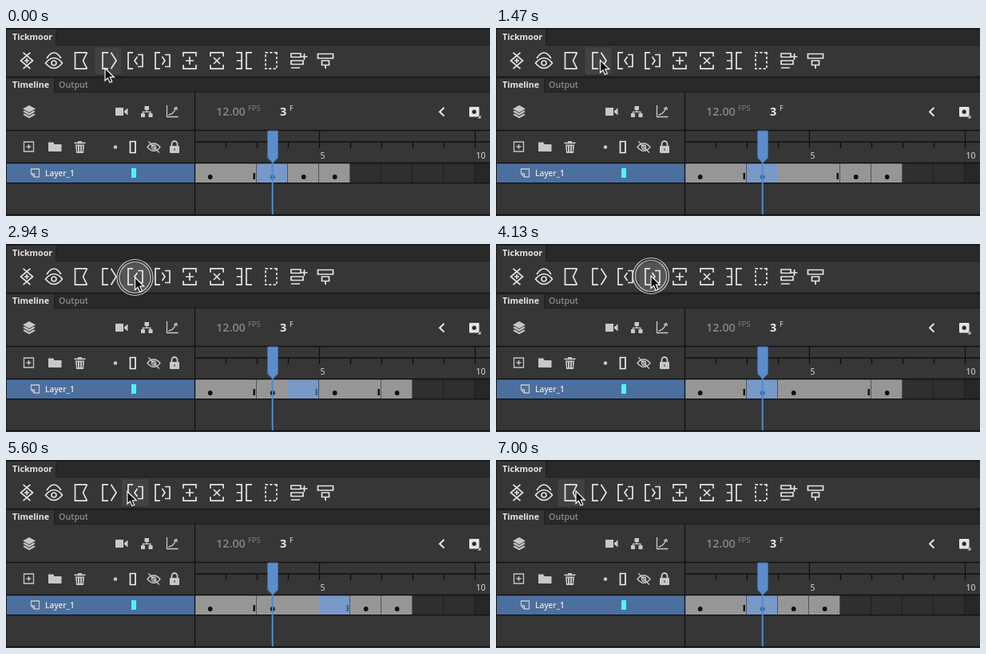
Animation, 606 px wide and 236 px high, one loop 7140 ms. Source, as an HTML page:

```html
<!DOCTYPE html>
<html lang="en">
<head>
<meta charset="utf-8">
<title>Timeline panel</title>
<style>
html, body { margin: 0; width: 100%; height: 100%; overflow: hidden; background: #363636; }
svg { display: block; width: 606px; height: 236px; }
text { font-family: "Open Sans", "Noto Sans", sans-serif; fill: #e6e6e6; }
.tab { font-size: 10.7px; font-weight: 700; }
.dim { fill: #858585; }
.rule { fill: none; stroke: #101010; stroke-width: 1.3; }
.thin { fill: none; stroke: #c8c8c8; stroke-width: 1.3; }
.solid { fill: #c8c8c8; }
#tools { fill: none; stroke: #e4e4e4; stroke-width: 1.7; }
#marquee { stroke-dasharray: 3.2 2.3; }
</style>
</head>
<body>
<svg viewBox="0 0 606 236">
  <rect width="606" height="236" fill="#363636"/>
  <!-- panel tabs -->
  <path fill="#1d1d1d" d="M0 0H606V2H0ZM0 60.500H606V63H0Z"/>
  <path fill="#292929" d="M62 2H606V21H62ZM60 63H606V80H60Z"/>
  <path fill="none" stroke="#1d1d1d" d="M62.500 2V21.500H606M60.500 63V80.500H606M.5 2V236"/>
  <text class="tab" x="8" y="15">Tickmoor</text>
  <text class="tab" x="8" y="75">Timeline</text>
  <text class="tab" x="66" y="75" style="fill:#8c8c8c;font-weight:600">Output</text>

  <rect id="hover" y="24" width="33" height="34" rx="2" fill="#424242"/>
  <g id="tools"></g>

  <!-- controls -->
  <g class="solid">
    <path id="sheet" d="M29 97L37 101.500L29 106L21 101.500Z"/>
    <path id="edge" d="M21 105L23.500 103.700L29 107L34.500 103.700L37 105L29 109.500Z"/>
    <use href="#edge" y="3.700"/>
    <path d="M137 100H147V110H137ZM148 104L152.500 100.500V109.500L148 106Z"/>
    <path d="M173.500 98h5.500v5h-5.500ZM169 107h5v5h-5ZM178.500 107h5v5h-5Z"/>
    <path d="M53 143.500H59L61 146H69.500V155H53Z"/>
    <path d="M85.500 143.500H90V142H95V143.500H99.500V145.300H85.500ZM87 146.500H98L97 157H88Z"/>
    <circle cx="137" cy="149.500" r="2.300"/>
    <rect x="205" y="148" width="12" height="9" rx="1"/>
    <path d="M594.500 109.500V113.500H590.500Z"/>
  </g>
  <g class="thin">
    <path d="M176.300 103V105.500M171.500 107V105.300H181V107"/>
    <path d="M201.500 97V111.500H215.500M203.500 109Q210 108 213 100M210 101.500L213.300 99.500L214.500 103"/>
    <path d="M22.500 143h12v12h-12ZM28.500 146v6M25.500 149h6"/>
    <path d="M155.500 142.500h6.500v14h-6.500Z" stroke="#eee" stroke-width="1.700"/>
    <path d="M177 149.500Q185 140 193 149.500Q185 159 177 149.500ZM178.500 142.500L192 156.500"/>
    <circle cx="185" cy="149.500" r="2.500"/>
    <path d="M207.500 148V145.500A3.500 3.500 0 0 1 214.500 145.500V148" stroke-width="1.800"/>
    <path d="M548.500 100L543 105.200L548.500 110.500" stroke="#e6e6e6" stroke-width="2"/>
  </g>
  <path d="M89.500 148v7m3 -7v7m3 -7v7M211 151v3" stroke="#363636"/>
  <rect x="580" y="99" width="12.500" height="12.500" rx="1" fill="#e4e4e4"/>
  <circle cx="586.200" cy="105.200" r="2.600" fill="#2b2b2b"/>
  <text class="dim" x="263" y="110" font-size="14.400" font-weight="600">12.00</text>
  <text class="dim" x="303" y="104" font-size="9.300">FPS</text>
  <text x="343" y="110" font-size="14.400" font-weight="700">3</text>
  <text x="355" y="104" font-size="9">F</text>

  <!-- ruler and layer row -->
  <path id="ruler" class="rule"/>
  <text x="393.500" y="164" font-size="10.500">5</text>
  <text x="588.500" y="164" font-size="10.500">10</text>
  <rect x="1" y="170" width="235" height="25" fill="#4b6f9f"/>
  <path class="thin" d="M31.500 177H41.500V187H35.500L31.500 183ZM31.500 183H35.500V187"/>
  <text x="49" y="186" font-size="10" font-weight="600">Layer_1</text>
  <rect x="157" y="176" width="6" height="12" fill="#52f3fb"/>
  <g id="cells"></g>
  <path class="rule" d="M0 169.500H606M0 194.700H606M236.500 80V236M0 234.500H606"/>
  <path d="M333.700 165V234" stroke="#4f8ad2" stroke-width="2"/>
  <path d="M327.500 129H340.500V163L334 169.500L327.500 163Z" fill="#5b8dcc" stroke="#40699f"/>

  <g id="ring" fill="#fff" stroke="#c4c4c4" stroke-width="1.200">
    <circle r="22.500" fill-opacity=".02"/>
    <circle r="19.500" fill-opacity=".08"/>
  </g>
  <path id="cursor" d="M0 0V15.500L3.500 12.200L6 18L8.800 16.800L6.300 11.200H11.300Z" fill="#0b0b0b" stroke="#f4f4f4" stroke-width="1.200"/>
</svg>
<script>
const LOOP = 7140, STEP = 70, X0 = 236, CELL = 39, PITCH = 34, FRAMES = 10;
const SELECTED = 3;
const el = id => document.getElementById(id);
const set = (id, name, value) => el(id).setAttribute(name, value);

// Icon parts, drawn around the centre of a tool button
const side = (x, dx, h = 10.2) => `M${x + dx} ${-h}H${x}V${h}H${x + dx}`;
const angle = (x, dx, h = 10.2) => `M${x + dx} ${-h}L${x} 0L${x + dx} ${h}`;
const cap = (y, dy) => `M-8 ${y + dy}V${y}H8V${y + dy}`;
const plus = (x, y, r) => `M${x - r} ${y}h${2 * r}M${x} ${y - r}v${2 * r}`;
const bar = (x, y, w, h) => `M${x} ${y}h${w}v${h}h${-w}Z`;
const caps = cap(-10.2, 5) + cap(10.2, -5);
const pair = side(-9, 6) + side(9, -6, 7.5);

const tools = {
  weave: angle(7.5, -12) + angle(-7.5, 12) + plus(0, 0, 3),
  eye: 'M-9 -3Q0 -17 9 -3M-10.500 3Q0 -10 10.500 3Q0 16 -10.500 3ZM-3 3a3 3 0 1 0 6 0a3 3 0 1 0 -6 0',
  shrink: side(-7.5, 15) + angle(2.5, 5),
  extend: side(-7, 7) + angle(10, -6.5),
  rollBack: pair + angle(-1, 3.5, 5),
  rollOn: pair + angle(3, -3.5, 5),
  add: caps + plus(0, 0, 5),
  clear: caps + 'M-4 -4L4 4M4 -4L-4 4',
  split: side(-3, -7) + side(3, 7) + 'M-9 0h6',
  marquee: side(-7, 14) + 'Z',
  stack: bar(-9, -9, 12, 4.5) + bar(-9, 0, 15, 4.5) + 'M-9 9H2' + plus(7.5, -5, 4),
  nest: bar(-9.5, -8.5, 19, 5.5) + bar(-4.5, 0, 9, 5.5) + 'M0 5.500V10'
};

// Each stop: travel time, button point, click times and their effect on
// the end of the selected span and on the frame count
const stops = [
  { from: 0, to: 420, tip: [130.5, 40.5], clicks: [980, 1470], end: 1, count: 1 },
  { from: 1610, to: 2100, tip: [161.5, 42], clicks: [2590, 3220], end: -1, count: 0 },
  { from: 3430, to: 3990, tip: [194, 40], clicks: [4340, 4900], end: 1, count: 0 },
  { from: 5110, to: 6160, tip: [100, 39], clicks: [6510, 7000], end: -1, count: -1 }
];

const left = n => X0 + (n - 1) * CELL;
const box = (x, y, w, h, fill) =>
  `<rect x="${x}" y="${y}" width="${w}" height="${h}" fill="${fill}"/>`;

function drawTools() {
  el('tools').innerHTML = Object.entries(tools).map(([id, d], i) =>
    `<path id="${id}" d="${d}" transform="translate(${26 + PITCH * i} 41)"/>`).join('');
}

function drawRuler() {
  let d = `M0 128.500H606M${X0} 143H606`;
  for (let n = 2; n <= FRAMES; n++) d += `M${left(n) + .5} ${n % 5 ? 143 : 129}V151`;
  set('ruler', 'd', d);
}

function spansAt(t) {
  const s = { end: 4, count: 5, picked: SELECTED };
  for (const stop of stops) {
    for (const click of stop.clicks) {
      if (t < click) return s;
      s.end += stop.end;
      s.count += stop.count;
      s.picked = stop.end > 0 && stop.count ? SELECTED : s.end - 1;
    }
  }
  return s;
}

function cellMarkup({ end, count, picked }) {
  const keys = [1, SELECTED, end, count];
  let out = '';
  for (let n = 1; n <= FRAMES; n++) {
    const x = left(n), next = left(n + 1);
    const used = n <= count, isKey = keys.includes(n);
    const ends = n >= count || keys.includes(n + 1);
    const ink = n === picked ? '#3f618f' : '#101010';
    const empty = n % 5 ? '#2f2f2f' : '#272727';
    out += box(x, 170, CELL, 25, n === picked ? '#7899c8' : used ? '#969696' : empty);
    if (isKey) out += `<circle cx="${x + 19.7}" cy="187" r="2.900" fill="${ink}"/>`;
    else if (used && ends) out += box(next - 4.5, 182, 2.5, 8, ink);
    out += ends ? box(next - .5, 170, 1.3, 25, '#101010') : box(next, 170, 1, 2, '#555');
  }
  return out;
}

function tipAt(t) {
  let tip = [124, 50.5];
  for (const s of stops) {
    const k = Math.max(0, Math.min(1, (t - s.from) / (s.to - s.from)));
    const ease = (1 - Math.cos(Math.PI * k)) / 2;
    tip = tip.map((v, i) => v + (s.tip[i] - v) * ease);
  }
  return tip;
}

// The ring shows at the press and fades before the edit lands
function ringAt(t) {
  const click = stops.flatMap(s => s.clicks).find(c => t >= c - 280 && t < c);
  return click ? Math.max(0, Math.min(1, (click - 70 - t) / 140)) : 0;
}

function render(ms) {
  const t = Math.floor((ms % LOOP) / STEP) * STEP;
  const [x, y] = tipAt(t), at = `translate(${x} ${y})`;
  set('cursor', 'transform', at);
  set('ring', 'transform', at);
  set('ring', 'opacity', ringAt(t));
  set('hover', 'x', 77.5 + PITCH * Math.floor((x - 77) / PITCH));
  el('cells').innerHTML = cellMarkup(spansAt(t));
}

drawTools();
drawRuler();
render(0);
const start = performance.now();
(function tick() {
  render(performance.now() - start);
  requestAnimationFrame(tick);
})();
</script>
</body>
</html>
```
